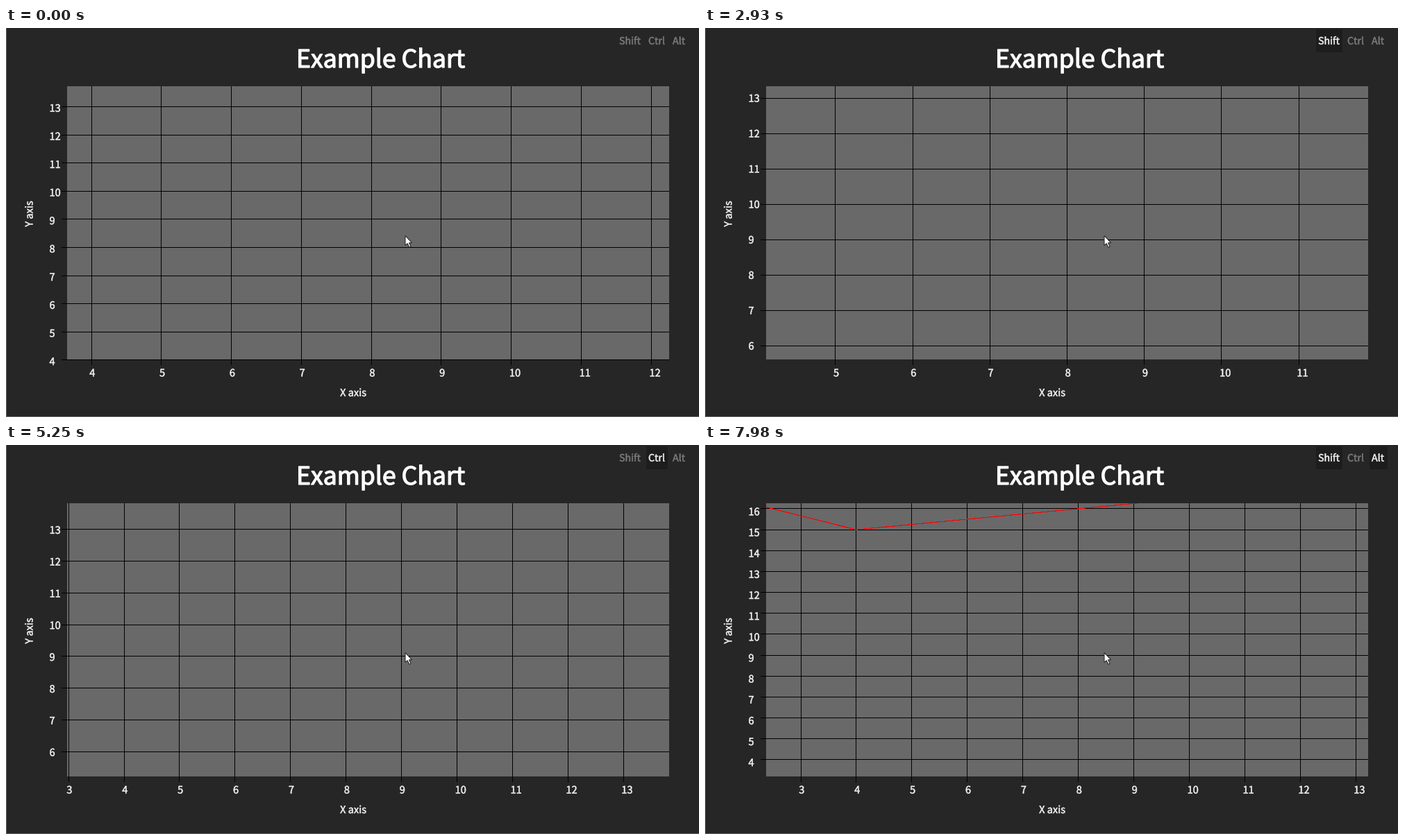
These frames come from a looping animation (998 px wide and 561 px high, 8000 ms). A matplotlib script:

```python
import math

import matplotlib.pyplot as plt
import numpy as np
from matplotlib.animation import FuncAnimation
from matplotlib.collections import LineCollection
from matplotlib.patches import Polygon, Rectangle
from matplotlib.patheffects import Stroke

W, H, DPI = 998, 561, 100
LOOP, STEP = 8000, 40
PX = 72 / DPI
HAIRLINE = 0.05  # without antialiasing this fills exactly one pixel
LEFT, TOP, RIGHT, BOTTOM = 88, 84, 955, 478
MOUSE_X, MOUSE_Y = 571, 299.4
BASE_X, BASE_Y, ZOOM = 79.9, 30.15, 5.22
WHITE, DIM = "#f4f4f4", "#7c7c7c"

# Mouse wheel bursts: first click, last click (ms), signed clicks, effect
BURSTS = [
    (650, 920, -5, "xy"), (1100, 1460, 5, "xy"), (1640, 1730, -2, "xy"),
    (2020, 2200, 2, "xy"),
    (2760, 3120, 4, "x"), (3210, 3920, -9, "x"), (4120, 4120, 1, "x"),
    (4320, 4700, -5, "y"), (4980, 5250, 4, "y"), (5440, 5640, -3, "y"),
    (6960, 7140, 3, "pan"), (7340, 7510, -3, "pan"), (7700, 7980, -4, "pan"),
]
PRESSED = {
    "Shift": lambda t: 2480 <= t < 4320 or t >= 6580,
    "Ctrl": lambda t: 4320 <= t < 6210,
    "Alt": lambda t: t >= 6780,
}

plt.rcParams["font.family"] = ["Noto Sans CJK JP", "DejaVu Sans"]
fig = plt.figure(figsize=(W / DPI, H / DPI), dpi=DPI, facecolor="#262626")
ax = fig.add_axes([0, 0, 1, 1])
ax.set_xlim(0, W)
ax.set_ylim(H, 0)
ax.axis("off")


def box(x, y, w, h, color):
    return ax.add_patch(Rectangle((x, y), w, h, fc=color, lw=0, zorder=1))


def label(x, y, text="", size=14.6, color=WHITE, **kw):
    """Text with a thin outline, for a medium weight."""
    return ax.text(x, y, text, fontsize=size * PX, color=color, zorder=5,
                   path_effects=[Stroke(linewidth=size * 0.035 * PX)], **kw)


box(0, 0, 1, H, "#606060")
box(0, H - 1, W, 1, "#606060")
plot_area = box(LEFT, TOP, RIGHT - LEFT, BOTTOM - TOP, "#696969")

label(418, 57, "Example Chart", 35.6, "white")
label(500, 531, "X axis", ha="center")
label(38.5, 268, "Y axis", rotation=90, rotation_mode="anchor", ha="center")

keys = {}
for name, x, width in [("Shift", 883, 31), ("Ctrl", 925, 24), ("Alt", 960, 19)]:
    keys[name] = box(x - 3, 2, width + 7, 33, "#1d1d1d"), label(x, 23.5, name, 14.2)

grid = LineCollection([], colors="black", linewidths=HAIRLINE,
                      antialiaseds=False, snap=False, zorder=2)
ax.add_collection(grid, autolim=False)
curve, = ax.plot([], [], color="red", lw=HAIRLINE, antialiased=False,
                 snap=False, zorder=3)
curve.set_clip_path(plot_area)

x_labels = [label(0, 0) for _ in range(16)]
y_labels = [label(0, 0) for _ in range(24)]
label_area = Rectangle((0, TOP - 4), W, 400.5, transform=ax.transData)
for item in y_labels:
    item.set_clip_path(label_area)

ARROW = [(0, 0), (0, 14), (3.2, 11.2), (5.8, 16.8), (8, 15.8), (5.5, 10.3),
         (9.6, 10.3)]
ax.add_patch(Polygon([(575 + x, 299.5 + y) for x, y in ARROW], fc="white",
                     ec="#202020", lw=PX, zorder=6))


def wheel_state(t):
    """Replay the clicks up to t; zoom level -1 shows the whole range."""
    x, y, pan = 4, 2, 0
    for start, end, clicks, effect in BURSTS:
        sign = 1 if clicks > 0 else -1
        for when in np.linspace(start, end, abs(clicks)):
            if when > t:
                return x, y, pan
            if effect == "pan":
                pan += sign
            if "x" in effect:
                x = max(x + sign, -1)
            if "y" in effect:
                y = max(y + sign, -1)
    return x, y, pan


def scale(base, level):
    return base + ZOOM * (level if level >= 0 else -2)


def place(labels, values, position):
    for item in labels:
        item.set_visible(False)
    for item, value in zip(labels, values):
        item.set(text=str(value), position=position(value), visible=True)


def draw(i):
    t = i * STEP + STEP / 2
    x_level, y_level, pan = wheel_state(t)
    sx, sy = scale(BASE_X, x_level), scale(BASE_Y, y_level)
    focus_x = (8.45 if t < 3120 else 9.025) + 0.15 * pan
    focus_y = 8.42 if t < 780 else 9.12

    def to_x(v):
        return MOUSE_X + (v - focus_x) * sx

    def to_y(v):
        return MOUSE_Y + (focus_y - v) * sy

    xs = [v for v in range(25) if LEFT <= to_x(v) <= RIGHT]
    ys = [v for v in range(25) if TOP <= to_y(v) <= BOTTOM + 1]
    columns = [round(to_x(v)) + 0.5 for v in xs]
    rows = [math.floor(to_y(v)) + 0.5 for v in ys]
    grid.set_segments([[(x, TOP), (x, 486)] for x in columns]
                      + [[(80, y), (RIGHT, y)] for y in rows])

    drop = 5 + max(0, (52 - sy) * 0.2)
    place(x_labels, xs, lambda v: (to_x(v) - 2.3, 502.5))
    place(y_labels, ys, lambda v: (62.5, to_y(v) + drop))
    curve.set_data([to_x(v) for v in (1, 4, 16)],
                   [to_y(v) for v in (17, 15, 18)])

    for name, (back, text) in keys.items():
        pressed = PRESSED[name](t)
        back.set_visible(pressed)
        text.set_color(WHITE if pressed else DIM)
    return []


anim = FuncAnimation(fig, draw, frames=LOOP // STEP, interval=STEP,
                     init_func=lambda: draw(0), repeat=True, repeat_delay=0,
                     blit=False)
plt.show()
```
